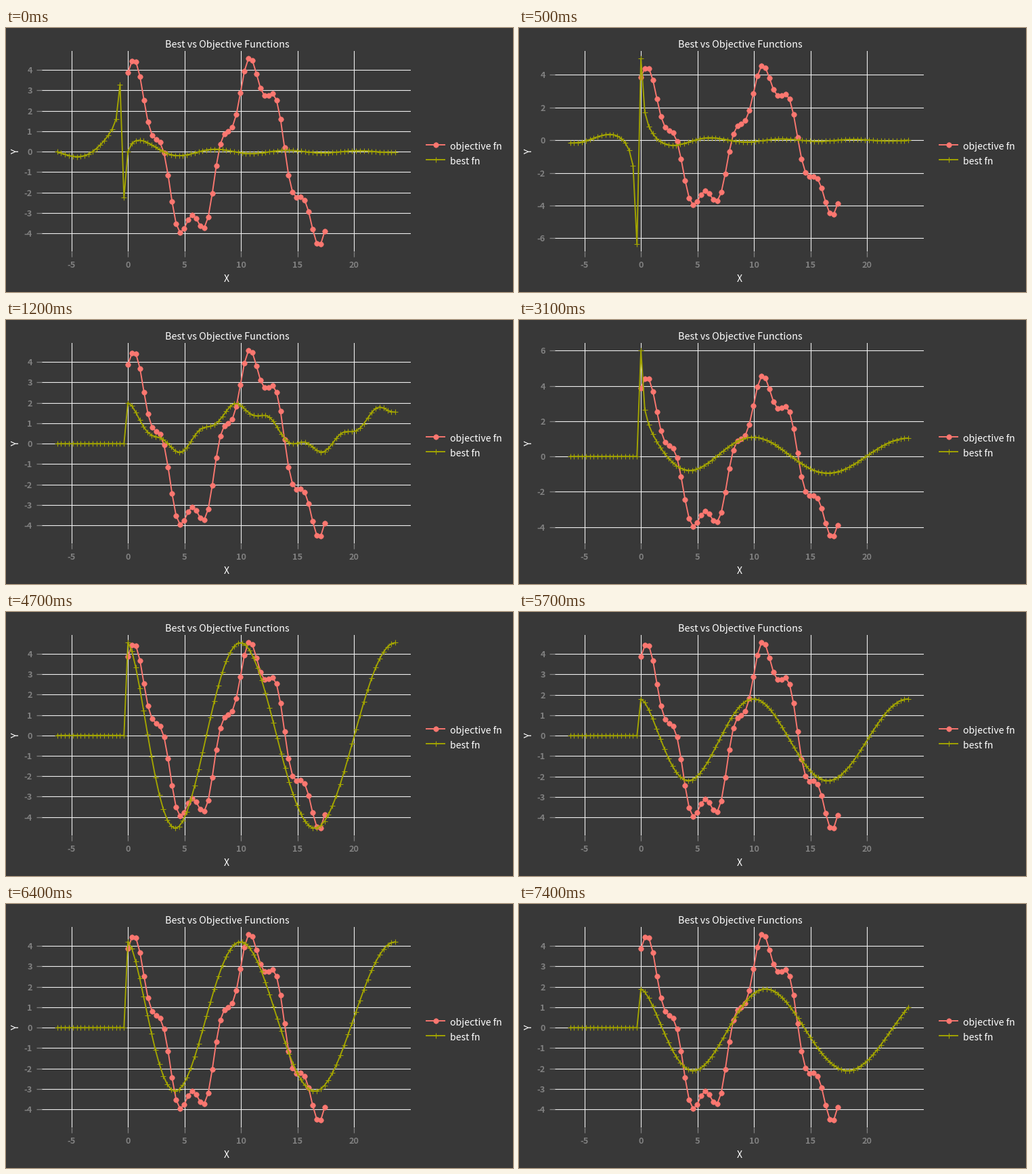
A matplotlib script that plays this animation: 749x391 px, repeating every 8000 ms.

```python
import numpy as np
import matplotlib.pyplot as plt
from matplotlib.animation import FuncAnimation
from matplotlib.lines import Line2D

W, H, DPI = 749, 391, 100
PX = 72 / DPI  # points per pixel
BG, GRID, GREY, RED, OLIVE = "#383838", "#f0f0f0", "#808080", "#fb7770", "#a3a500"
TICK_MS, LOOP_MS = 100, 8000
LEFT, RIGHT, TOP, BOTTOM = 53, 598, 34.3, 331.3  # plot panel, pixels from top left

plt.rcParams["font.family"] = ["Noto Sans CJK JP", "DejaVu Sans"]
plt.rcParams["axes.unicode_minus"] = False

# Objective: a slow wave with a fast ripple on it
OBJ_X = np.linspace(0, 17.4, 50)
OBJ = 3.9 * np.cos(.563 * OBJ_X) + .76 * np.sin(2.51 * OBJ_X - .1) + .05
X = np.arange(-18, 69) * .3477
POS = np.maximum(X, 0)


def right(y):
    """Zero wherever the power of a negative x is undefined."""
    return np.where(X >= 0, y, 0)


def wave(amp, shift=0, rate=1):
    return right(amp * np.cos(rate * POS ** .8) + shift)


# (start in ms, best candidate)
STAGES = [
    (0, np.sin(X) / (X + .5)),
    (500, np.cos(X) / (X + .2)),
    (1200, right(np.cos(np.sin(X)) + np.cos(POS ** .8))),
    (3100, right(np.cos(POS ** .8) + 5 / (1 + 5.4 * POS))),
    (4700, wave(4.55)),
    (5700, wave(2, -.2)),
    (6100, wave(3.55)),
    (6400, wave(3.65, .55)),
    (7400, wave(2, -.1, .922)),
]

fig = plt.figure(figsize=(W / DPI, H / DPI), dpi=DPI, facecolor=BG)
ax = fig.add_axes([LEFT / W, 1 - BOTTOM / H, (RIGHT - LEFT) / W, (BOTTOM - TOP) / H],
                  facecolor=BG)
ax.set_xlim((LEFT - 180.1) / 16.71, (RIGHT - 180.1) / 16.71)
ax.set_xticks(range(-5, 21, 5))
ax.set_axisbelow(True)
ax.grid(color=GRID, lw=1.1 * PX)
for side in ax.spines.values():
    side.set_visible(False)
ax.tick_params(length=8 * PX, width=1.3 * PX, color=GREY, labelcolor=GREY,
               labelsize=12.8 * PX)
ax.tick_params(axis="x", pad=6 * PX)
ax.tick_params(axis="y", pad=6 * PX)
ax.yaxis.set_major_formatter("{x:.0f}")

red_style = dict(color=RED, lw=1.9 * PX, marker="o", ms=7.6 * PX, mew=.5 * PX)
olive_style = dict(color=OLIVE, lw=1.9 * PX, marker="+", ms=8 * PX, mew=1.1 * PX)
ax.plot(OBJ_X, OBJ, zorder=3, **red_style)
best, = ax.plot(X, X, zorder=4, **olive_style)


def text(x, y, s, size=14, **kw):
    kw = {"ha": "center", "va": "center_baseline", **kw}
    fig.text(x / W, 1 - y / H, s, color="white", fontsize=size * PX, **kw)


def legend_row(y, label, style):
    fig.add_artist(Line2D([621 / W, 634.5 / W, 648 / W], [1 - y / H] * 3,
                          markevery=[1], **style))
    text(655.5, y + 1.5, label, ha="left")


text(326.5, 24, "Best vs Objective Functions", size=14.35)
text(325.5, 371, "X")
text(15.3, 182, "Y", rotation=90, va="center")
legend_row(173, "objective fn", red_style)
legend_row(194.5, "best fn", olive_style)


def draw(i):
    t = i * TICK_MS
    y = [curve for start, curve in STAGES if start <= t][-1]
    best.set_ydata(y)
    lo, hi = min(y.min(), OBJ.min()), max(y.max(), OBJ.max())
    pad = .04 * (hi - lo)
    step = 2 if hi - lo > 9.5 else 1
    ax.set_ylim(lo - pad, hi + pad)
    ax.set_yticks(np.arange(np.ceil(lo / step), np.floor(hi / step + .01) + 1) * step)
    for label in ax.get_xticklabels() + ax.get_yticklabels():
        label.set_fontweight("bold")
    return best,


anim = FuncAnimation(fig, draw, frames=LOOP_MS // TICK_MS, interval=TICK_MS,
                     repeat=True, repeat_delay=0, blit=False)
plt.show()
```
